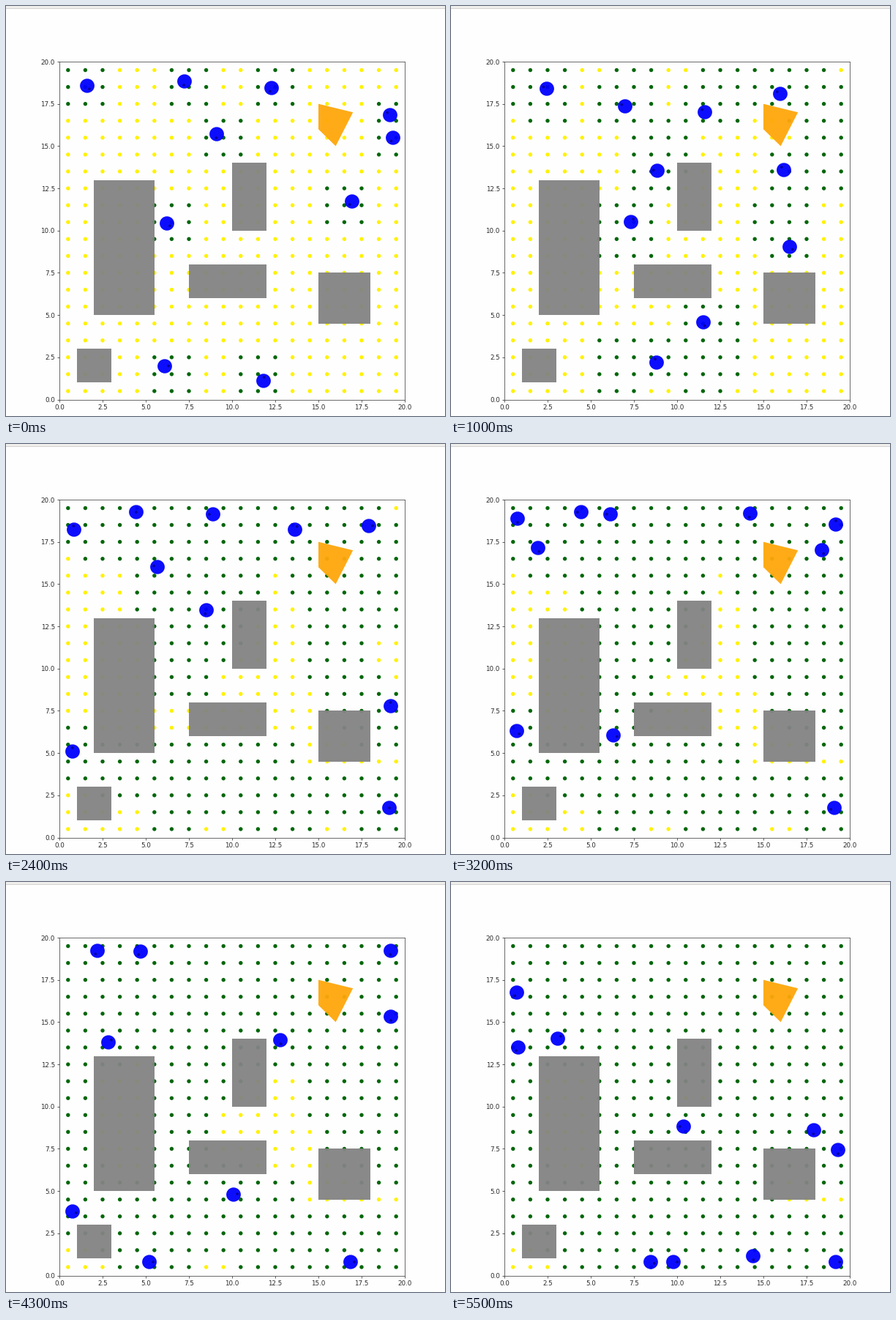
Animation of 600 by 560 pixels, one loop 5600 ms. Source, as a matplotlib script:

```python
import math

import matplotlib.pyplot as plt
import numpy as np
from matplotlib.animation import FuncAnimation
from matplotlib.patches import Circle, Polygon, Rectangle

W, H, DPI = 600, 560, 100
LEFT, RIGHT, TOP, BOTTOM = 73, 545, 76, 537.5
SIZE, RADIUS = 20, 0.42
FRAMES, STEP_MS = 56, 100
KEYS = [0, 10, 18, 24, 32, 43, 55]
YELLOW, GREEN = (1.0, 0.95, 0.0), (0.0, 0.4, 0.03)
WALLS = [(2, 5, 3.5, 8), (10, 10, 2, 4), (7.5, 6, 4.5, 2),
         (15, 4.5, 3, 3), (1, 1, 2, 2)]


def pt(px):
    """Points for a length in pixels."""
    return px * 72 / DPI


def to_grid(x, y):
    return ((x - LEFT) * SIZE / (RIGHT - LEFT),
            (BOTTOM - y) * SIZE / (BOTTOM - TOP))


def robot(start, *legs):
    """Each leg is walked at even speed between two keys; an empty leg waits."""
    times, points = [0.0], [start]
    for t0, t1, leg in zip(KEYS, KEYS[1:], legs):
        leg = leg or [points[-1]]
        chain = [points[-1]] + leg
        lengths = [math.dist(a, b) for a, b in zip(chain, chain[1:])]
        done = np.cumsum(lengths) / (sum(lengths) or 1)
        done[-1] = 1
        times += list(t0 + (t1 - t0) * done)
        points += leg
    return np.array(times), np.array([to_grid(*p) for p in points])


# Stage positions in pixels at the key times, with a turn where one is needed.
ROBOTS = [
    robot((111, 109), [(125, 129), (131, 113)], [(99, 96)], [(93, 117)],
          [(91, 102)], [(91, 450)], [(273, 519)]),
    robot((244, 103), [(238, 137)], [(196, 117)], [(178, 93)], [],
          [(125, 94)], [(90, 151)]),
    robot((363, 112), [(347, 145)], [(298, 100)], [(283, 96)],
          [(218, 96)], [(184, 95)], [(92, 226)]),
    robot((525, 149), [(490, 118), (450, 120)], [(415, 96)], [(496, 112)],
          [(526, 110)], [(526, 94)], [(496, 339)]),
    robot((529, 180), [(505, 222), (455, 224)], [(433, 197)], [(395, 117)],
          [(409, 95)], [(375, 216)], [(392, 335), (318, 334)]),
    robot((288, 175), [(282, 225)], [(205, 213), (246, 209)], [(207, 168)],
          [(119, 142)], [(140, 219)], [(146, 214)]),
    robot((473, 267), [(447, 300), (463, 329)], [(525, 385)], [(526, 358)],
          [(507, 145)], [(526, 184)], [(529, 366)]),
    robot((220, 297), [(243, 315), (246, 295)], [(326, 195)], [(274, 227)],
          [(222, 398)], [(311, 427)], [(405, 410), (413, 511)]),
    robot((217, 492), [(281, 487)], [(262, 439), (165, 453)], [(91, 420)],
          [(90, 392)], [(196, 519)], [(304, 519)]),
    robot((352, 512), [(362, 441), (345, 432)], [(370, 493), (492, 483)],
          [(524, 497)], [], [(471, 519)], [(526, 519)]),
]


def avoid_walls(x, y):
    """Slide a robot that would overlap a wall to the wall's nearest side."""
    for wx, wy, w, h in WALLS:
        west, east = wx - RADIUS, wx + w + RADIUS
        south, north = wy - RADIUS, wy + h + RADIUS
        if west < x < east and south < y < north:
            sides = [(west, y), (east, y), (x, south), (x, north)]
            x, y = min(sides, key=lambda s: math.dist(s, (x, y)))
    return np.array([x, y])


def place(bot, t):
    times, path = bot
    return avoid_walls(*(np.interp(t, times, path[:, k]) for k in (0, 1)))


def heading(bot, t):
    t = min(t, FRAMES - 1.5)
    d = place(bot, t + 0.5) - place(bot, t)
    return d / (np.hypot(*d) or 1)


def first_seen():
    """Frame at which each grid point first lies in the 3 x 3 cells of a robot."""
    seen = np.full((SIZE, SIZE), np.inf)
    for t in np.arange(0, FRAMES - 0.9, 0.25):
        for bot in ROBOTS:
            col, row = place(bot, t).astype(int)
            box = seen[max(row - 1, 0):row + 2, max(col - 1, 0):col + 2]
            np.minimum(box, math.ceil(t), out=box)
    return seen.ravel()


seen_at = first_seen()

fig = plt.figure(figsize=(W / DPI, H / DPI), dpi=DPI, facecolor="#fefefe")
fig.add_artist(Rectangle((0, 1 - 3 / H), 1, 3 / H, color="#f0eeec", lw=0))
fig.add_artist(Rectangle((0, 1 - 4 / H), 1, 1.2 / H, color="#d6d4d2", lw=0))

ax = fig.add_axes([LEFT / W, 1 - BOTTOM / H, (RIGHT - LEFT) / W,
                   (BOTTOM - TOP) / H], facecolor="#fefefe")
ax.set(xlim=(0, SIZE), ylim=(0, SIZE))
ticks = np.arange(0, SIZE + 0.1, 2.5)
labels = [f"{v:.1f}" for v in ticks]
ax.set_xticks(ticks, labels)
ax.set_yticks(ticks, labels)
ax.tick_params(length=pt(3.1), width=pt(0.8), pad=pt(3.1),
               labelsize=pt(8.8), labelfontfamily="DejaVu Sans",
               color="#333333", labelcolor="#2a2a2a")
for spine in ax.spines.values():
    spine.set(linewidth=pt(0.8), edgecolor="#484848")

gx, gy = np.meshgrid(np.arange(SIZE) + 0.5, np.arange(SIZE) + 0.5)
dots = ax.scatter(gx.ravel(), gy.ravel(), s=pt(5.4) ** 2, lw=0, zorder=1)

solid = dict(alpha=0.95, lw=0, zorder=2)
for x, y, w, h in WALLS:
    ax.add_patch(Rectangle((x, y), w, h, fc="#838383", **solid))
ax.add_patch(Polygon([(15, 17.5), (17, 17), (16, 15), (15, 16)],
                     fc="#ffa70a", **solid))

bodies, noses = [], []
for _ in ROBOTS:
    bodies.append(ax.add_patch(Circle((0, 0), RADIUS, fc="blue", alpha=0.95,
                                      lw=0, zorder=3)))
    noses.append(ax.add_patch(Circle((0, 0), 0.08, fc="#0404a0", lw=0,
                                     zorder=4)))


def draw(i):
    dots.set_facecolors([GREEN if s <= i else YELLOW for s in seen_at])
    for bot, body, nose in zip(ROBOTS, bodies, noses):
        pos = place(bot, i)
        body.center = pos
        nose.center = pos + 0.22 * heading(bot, i)
    return [dots, *bodies, *noses]


anim = FuncAnimation(fig, draw, frames=FRAMES, interval=STEP_MS, repeat=True,
                     repeat_delay=0, blit=False)
plt.show()
```
